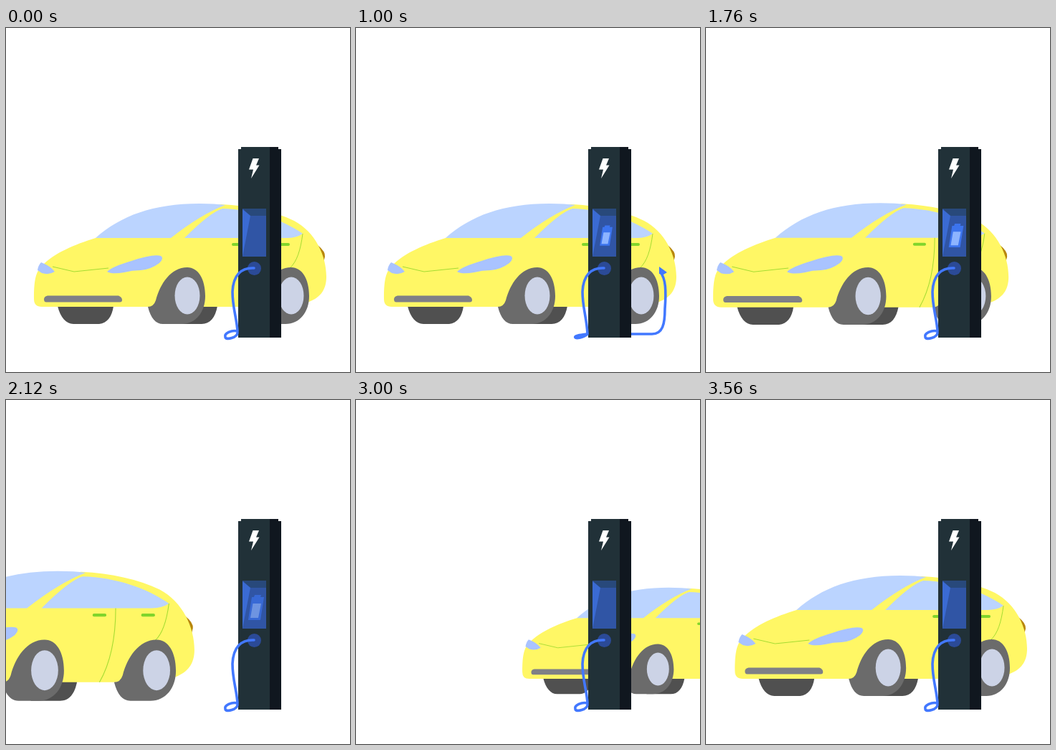
An HTML page that plays this animation: 480x480 px, repeating every 3.6 s.

```html
<!DOCTYPE html>
<html lang="en">
<head>
<meta charset="utf-8">
<title>Charging station</title>
<style>
  html, body { margin: 0; width: 100%; height: 100%; overflow: hidden; background: #fff; }
  svg { display: block; width: 100%; height: 100%; }
  .cable { fill: none; stroke: #4278ff; stroke-width: 3.6; stroke-linecap: round; stroke-linejoin: round; }
  .seam { fill: none; stroke: #a4dc32; stroke-width: 1; }
  .handle { stroke: #80d52c; stroke-width: 4; stroke-linecap: round; }
</style>
</head>
<body>
<svg viewBox="0 0 480 480">
  <defs>
    <g id="wheel">
      <path fill="#6b6b6b" d="M198 389C202 405 209 413 219 413H245C265 413 278 396 278 374C278 350 268 334 253 334C230 334 215 357 209 380Q206 389 198 389Z"/>
      <ellipse cx="253" cy="373.5" rx="17.5" ry="26" fill="#ccd3e6"/>
    </g>
    <g id="car">
      <path fill="#505050" d="M72 388C76 404 84 413 94 413H130C141 412 148 403 150 388ZM235 388H295C292 404 285 413 273 413H235Z"/>
      <path fill="#b8860b" d="M435 303Q446 312 445 319L443 327Z"/>
      <path fill="#fff765" d="M39 378C39 350 42 340 50 332C67 314 96 302 125 293L229 262L300 246C340 248 375 256 402 269C432 285 447 318 447 347C447 366 438 376 423 382L395 389H50Q39 389 39 378Z"/>
      <path fill="#bbd4ff" d="M125 293C160 262 205 245 270 245Q292 245 306 247Q272 260 230 293Z"/>
      <path fill="#bbd4ff" d="M249 293Q285 257 302 252C345 253 385 267 414 287Q405 293 392 293Z"/>
      <path class="seam" d="M65 333L95 340L143 335M345 293C345 335 337 366 324 389M414 287C411 310 406 326 396 335"/>
      <path class="handle" d="M317 302H331M380 302H394"/>
      <path fill="#a9c3ff" d="M49 327Q62 332 68 340Q60 345 50 342L44 338Q45 331 49 327Z"/>
      <path fill="#a9c3ff" d="M141 340Q148 333 175 325Q205 315 216 318Q221 321 214 328Q202 337 188 338Q176 338 165 341Q148 344 141 340Z"/>
      <path fill="#7f8086" d="M58 373.500H157Q162 375.500 162 379.500Q162 382.500 159 382.500H56Q53 382.500 53 378.500Q53 374.500 58 373.500Z"/>
      <use href="#wheel"/>
      <use href="#wheel" x="145"/>
    </g>
  </defs>

  <use id="leaving" href="#car"/>
  <use id="arriving" href="#car"/>

  <path id="lead" class="cable" pathLength="100" d="M322 427H413C428 427 431 413 431 392C433 366 432 350 425 341"/>
  <path id="plug" fill="#4278ff" d="M423 333L434 341L429 344L423 343Z"/>

  <path fill="#213138" d="M328 166H368V432H324V169H328Z"/>
  <path fill="#10171f" d="M368 166H380V169H384V432H368Z"/>
  <path id="bolt" fill="#fff" d="M344.500 182H353L349 191.500H353.500L342 210L345 197.500H339Z"/>
  <path fill="#3055a5" d="M330 252H363V319H330Z"/>
  <path fill="#28497b" d="M330 252H363V262H341Z"/>
  <path fill="#3b6bd3" d="M330 253L341 262L330 319Z"/>
  <g id="battery">
    <path fill="#3c74ee" d="M343 275H346L347 272H356L355 275H360L355 307H338Z"/>
    <path fill="#8db4ff" d="M344.500 284H356L352 304H341Z"/>
  </g>
  <circle cx="346.500" cy="335.500" r="9.500" fill="#2b4a97"/>
  <path id="coil" class="cable"/>
</svg>
<script>
  const LOOP = 3600, STEP = 40;
  const el = id => document.getElementById(id);
  const [leaving, arriving, lead, plug, bolt, battery, coil] =
    ['leaving', 'arriving', 'lead', 'plug', 'bolt', 'battery', 'coil'].map(el);

  const ramp = (t, from, to) => Math.min(1, Math.max(0, (t - from) / (to - from)));
  const ease = u => u * u * (3 - 2 * u);
  const mix = (a, b, u) => (a + (b - a) * u).toFixed(2);
  const show = (node, on) => node.style.display = on ? '' : 'none';

  // Scale around (x, y), then slide sideways.
  const place = (node, x, y, scale, shift = 0) => node.setAttribute('transform',
    `translate(${x + shift} ${y}) scale(${scale}) translate(${-x} ${-y})`);

  function drawCars(t) {
    const out = Math.max(0, t - 1580);
    const gone = out * out * (8.5e-4 - 3.81e-7 * out);
    place(leaving, 398, 326, 1 + gone * 0.00041, -gone);
    show(leaving, t < 2640);

    const left = LOOP - t, brake = Math.min(left, 600);
    const ahead = brake * brake * (8.58e-4 - 5.36e-7 * brake) + 0.45 * (left - brake);
    place(arriving, 39, 390, 1 - ahead * 0.0006, ahead);
    show(arriving, t > 2400);
  }

  function drawCable(t) {
    const p = ease(ramp(t, 0, 520)) - ease(ramp(t, 1140, 1580));
    lead.setAttribute('stroke-dasharray', `${p * 100} 200`);
    show(lead, p > 0);
    show(plug, p > 0.96);
    const top = mix(421, 428, p), right = mix(323, 318, p);
    coil.setAttribute('d', `M346 335C328 334 317 345 316 368C316 390 322 405 323 ${mix(423, 427, p)}` +
      `C315 ${top} 304 ${mix(426, 429, p)} 306 ${mix(431.5, 432, p)}` +
      `C307 ${mix(436, 433.5, p)} ${right} 432 323 ${mix(425, 427, p)}`);
  }

  function drawStation(t) {
    place(bolt, 346, 196, 1 + 0.12 * Math.sin(Math.PI * Math.min(t, 1500) / 500) ** 2);
    place(battery, 349, 290, 0.81 + 0.00017 * (t - 1000));
    battery.setAttribute('opacity', ramp(t, 240, 600) - ramp(t, 2040, 2280));
  }

  function frame(now) {
    const t = Math.floor(now % LOOP / STEP) * STEP;
    drawCars(t);
    drawCable(t);
    drawStation(t);
    requestAnimationFrame(() => frame(performance.now() - start));
  }

  const start = performance.now();
  frame(0);
</script>
</body>
</html>
```
